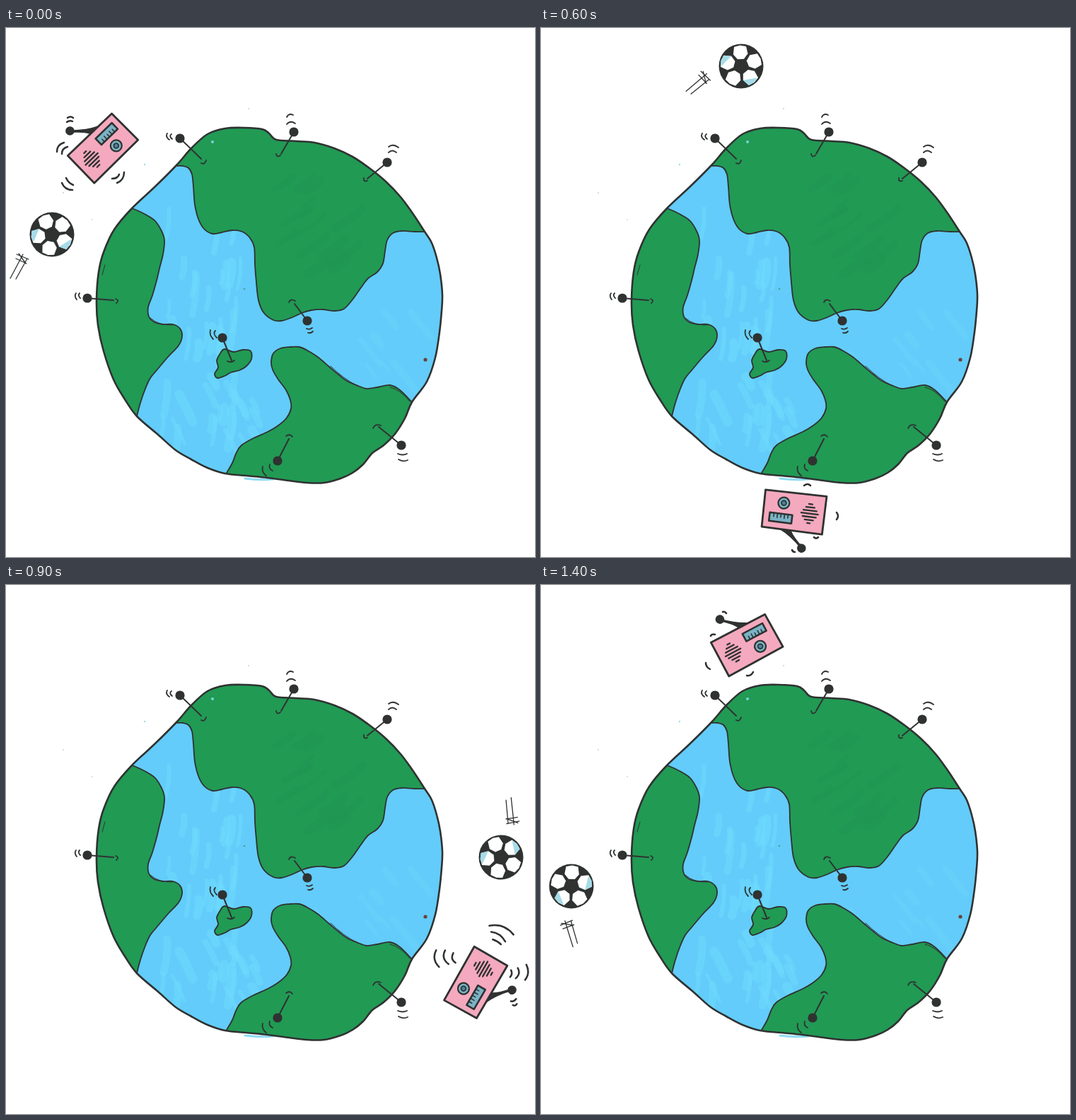
An HTML page that plays this animation: 748 by 748 pixels, repeating every 1500 ms.

```html
<!DOCTYPE html>
<html lang="en">
<head>
<meta charset="utf-8">
<title>Radios around the world</title>
<style>
html, body { margin: 0; width: 100%; height: 100%; overflow: hidden; background: #fff; }
svg { display: block; width: 100vw; height: 100vh; }
path, line { stroke-linecap: round; stroke-linejoin: round; }
.ink { fill: none; stroke: #2f3231; }
.dark { fill: #2f3231; }
</style>
</head>
<body>
<svg viewBox="0 0 748 748">
  <defs><clipPath id="globe"><path id="globeClip"/></clipPath></defs>
  <g id="world"></g>
  <g id="ball"></g>
  <path id="marks" class="ink" stroke-width="2.5"/>
  <g id="radio"></g>
</svg>
<script>
const NS = 'http://www.w3.org/2000/svg';
const $ = id => document.getElementById(id);

function add(parent, tag, attrs) {
  const el = document.createElementNS(NS, tag);
  for (const k in attrs) el.setAttribute(k, attrs[k]);
  parent.appendChild(el);
  return el;
}

// Smooth path through a list of "x,y" points
function curve(text, closed) {
  const p = text.split(' ').map(s => s.split(',').map(Number));
  const n = p.length;
  const at = i => closed ? p[(i + n) % n] : p[Math.max(0, Math.min(n - 1, i))];
  let d = 'M' + p[0];
  for (let i = 0; i < (closed ? n : n - 1); i++) {
    const [a, b, c, e] = [at(i - 1), at(i), at(i + 1), at(i + 2)];
    d += 'C' + [0, 1].map(k => (b[k] + (c[k] - a[k]) / 6).toFixed(1)) +
      ' ' + [0, 1].map(k => (c[k] - (e[k] - b[k]) / 6).toFixed(1)) + ' ' + c;
  }
  return closed ? d + 'Z' : d;
}

let seed = 7;
const rnd = () => (seed = (seed * 16807) % 2147483647) / 2147483647;

function brush(parent, n, [x, y, w, h], len, slope, color, opacity) {
  for (let i = 0; i < n; i++) {
    const px = x + rnd() * w, py = y + rnd() * h, l = len * (0.4 + rnd());
    add(parent, 'path', {
      d: `M${px} ${py}q${l * slope * 0.3 + 3} ${l * 0.4} ${l * slope} ${l}`,
      fill: 'none', stroke: color, 'stroke-width': 4 + rnd() * 9, opacity
    });
  }
}

function drawWorld() {
  const g = $('world');
  const outline = curve('310,142 336,141 362,143 372,149 382,158 410,160 436,162 464,170 490,182 515,199 537,217 558,239 575,262 592,288 602,304 609,325 614,348 617,377 616,400 613,430 607,466 595,500 574,529 564,552 550,574 534,590 518,601 505,617 490,629 473,637 450,643 425,643 400,640 370,636 340,633 310,630 285,622 262,610 240,597 215,575 185,549 168,525 152,497 138,457 130,420 128,385 131,345 138,317 153,285 178,255 210,225 242,193 262,170 285,150', true);
  const north = curve('242,195 250,195 258,198 263,207 265,225 267,250 272,270 280,284 292,291 305,289 320,286 334,288 345,297 351,310 352,335 354,360 357,385 364,402 378,413 390,414 405,409 418,403 432,399 448,398 465,400 478,397 490,384 502,367 512,354 525,345 533,333 536,315 539,300 547,290 560,287 578,288 592,288');
  const west = curve('178,255 190,260 203,267 212,274 220,287 224,300 222,320 217,340 213,357 207,378 201,395 202,408 210,416 222,419 236,419 246,425 249,436 244,449 230,464 213,484 204,495 197,510 190,530 185,549');
  const south = curve('312,629 320,615 326,600 333,590 350,580 370,571 385,562 397,551 403,538 402,526 396,512 385,497 377,483 375,472 378,460 388,453 402,451 415,451 428,457 442,466 457,479 470,490 482,499 498,506 510,510 525,508 543,505 557,512 574,529');
  const island = curve('309,454 322,458 335,455 346,457 347,468 340,478 330,484 318,487 309,492 299,495 295,489 300,480 298,470 303,460', true);
  $('globeClip').setAttribute('d', outline);

  add(g, 'path', { d: 'M338 637q20 3 40 1', stroke: '#8fdcf2', 'stroke-width': 3, fill: 'none' });
  const inside = add(g, 'g', { 'clip-path': 'url(#globe)' });
  add(inside, 'path', { d: outline, fill: '#63ccfa' });
  brush(inside, 34, [222, 255, 110, 320], 42, -0.1, '#70dafe', 0.55);
  brush(inside, 12, [215, 490, 150, 90], 28, 0.5, '#70dafe', 0.55);
  brush(inside, 9, [400, 400, 180, 80], 30, 0.8, '#6ad3fc', 0.5);
  const lands = [north + 'L700 288V0H200Z', west + 'L0 549V255Z', south + 'L700 529V700H312Z', island];
  lands.forEach(d => add(inside, 'path', { d, fill: '#219a54' }));
  brush(inside, 14, [385, 200, 120, 130], 26, -1.4, '#1e9450', 0.4);
  [north, west, south, island].forEach(d => add(g, 'path', { d, class: 'ink', 'stroke-width': 1.8 }));
  add(g, 'path', { d: outline, class: 'ink', 'stroke-width': 2.6 });
  add(g, 'path', { d: 'M204 410q12 11 32 10M459 478q18 18 38 28M543 508q14 3 28 20M136 349l4-14', class: 'ink', 'stroke-width': 1 });

  const specks = [[593, 469, 2.6, '#6b4038'], [292, 161, 2, '#7fd0dc'], [196, 193, 1.2, '#9adbe8'],
    [343, 114, 0.8, '#aaa'], [81, 233, 0.8, '#aaa'], [122, 271, 0.8, '#bbb'], [337, 369, 1.3, '#4f9f8e']];
  specks.forEach(([cx, cy, r, fill]) => add(g, 'circle', { cx, cy, r, fill }));

  // foot x, y, head x, y, then foot curve and wiggle marks
  const pins = [
    [276, 185, 246, 156, 'M276 191Q281 194 283 187M234 150Q230 153 235 157M228 149Q225 154 231 158'],
    [389, 178, 407, 147, 'M382 178Q383 184 388 180M397 126Q400 120 406 123M397 136Q402 130 409 135'],
    [511, 213, 539, 190, 'M506 212Q505 218 511 216M541 168Q547 163 555 169M541 176Q546 171 552 176'],
    [152, 385, 115, 382, 'M155 383Q161 385 156 389M104 375Q101 378 105 382M99 375Q96 379 100 384'],
    [408, 390, 426, 414, 'M400 388Q402 382 409 386M425 425Q429 427 433 424M427 431Q431 432 434 429'],
    [319, 470, 306, 438, 'M313 471Q318 474 323 470M296 428Q292 432 298 438M289 427Q287 434 293 440'],
    [400, 581, 384, 612, 'M396 577Q401 573 405 578M373 617Q371 623 377 626M363 620Q361 628 368 633'],
    [527, 564, 559, 590, 'M519 566Q522 559 530 562M554 602Q561 605 567 602M555 610Q561 614 568 611']
  ];
  pins.forEach(([x1, y1, x2, y2, d]) => {
    add(g, 'line', { x1, y1, x2, y2, class: 'ink', 'stroke-width': 2 });
    add(g, 'circle', { cx: x2, cy: y2, r: 6.6, class: 'dark' });
    add(g, 'path', { d, class: 'ink', 'stroke-width': 1.8 });
  });
}

function drawRadio() {
  const g = $('radio');
  add(g, 'path', { d: 'M1 -27L18 -27Q2 -34 -15 -50L-17 -47Q-4 -36 1 -27Z', class: 'dark' });
  add(g, 'circle', { cx: -16.5, cy: -50, r: 6.3, class: 'dark' });
  add(g, 'path', { d: 'M-43 -27L43 -26.5L44 26L-43 27Z', fill: '#f4a9be', stroke: '#2f3231', 'stroke-width': 2.8 });
  add(g, 'path', { d: 'M2 -17H34V-5H2Z', fill: '#79b3c5', stroke: '#2f3231', 'stroke-width': 2.6 });
  add(g, 'path', { d: 'M8 -6v-4M13 -6v-5M18 -6v-4M23 -6v-5M28 -6v-4', class: 'ink', 'stroke-width': 1.6 });
  add(g, 'circle', { cx: 16, cy: 10.5, r: 8, fill: '#79b3c5', stroke: '#2f3231', 'stroke-width': 2.2 });
  add(g, 'circle', { cx: 16, cy: 10.5, r: 3.4, fill: '#4f8498', stroke: '#2f3231', 'stroke-width': 1.8 });
  [4, 12, 19, 24, 19, 12, 5].forEach((w, i) =>
    add(g, 'path', { d: `M${-22 - w / 2} ${(i - 3) * 4.5}h${w}`, class: 'ink', 'stroke-width': 2.3 }));
}

function drawBall() {
  const g = $('ball');
  const polar = (r, deg) => [r * Math.cos(deg * Math.PI / 180), r * Math.sin(deg * Math.PI / 180)].map(v => v.toFixed(1));
  const poly = (pts, fill) => add(g, 'path', { d: 'M' + pts.map(p => polar(...p)).join('L') + 'Z', fill });
  add(g, 'circle', { r: 31.5, class: 'dark' });
  for (let a = -115; a < 245; a += 72) {
    poly([[11, a - 24], [20, a - 31], [29, a - 17], [29.5, a], [29, a + 17], [20, a + 31], [11, a + 24]], '#fff');
    if (a === 29 || a === 173) poly([[20, a + 31], [29, a + 17], [29.5, a], [28, a - 15]], '#a5dbe8');
  }
  return add(g, 'path', {
    d: 'M-41 28L-59 62M-35 34L-51 63M-50 28L-33 35M-51 34L-36 41M-47 27L-37 41',
    class: 'ink', 'stroke-width': 1.3
  });
}

// Tracks around the globe: step, x, y, turn, scale
const CX = 373, CY = 390;
const radioTrack = track([
  [0, 137, 170, -44, 1], [1, 75, 330, -76, 1], [2, 63, 505, -109, 1], [4, 193, 658, -159, 1],
  [6, 358, 684, -173, 1], [8, 634, 648, -223, 1], [9, 664, 562, -240, 1], [11, 681, 345, -278, 1],
  [12, 650, 230, -312, 1], [14, 291, 85, -388, 1], [15, 137, 170, -404, 1]
]);
const ballTrack = track([
  [0, 65, 292, 0, 1], [2, 145, 264, 18, 0.5], [4, 168, 217, 22, 0.46], [6, 283, 54, 22, 1],
  [8, 657, 155, 100, 1], [9, 700, 385, 146, 1], [11, 365, 711, 236, 1], [12, 208, 712, 258, 1],
  [14, 43, 426, 315, 1], [15, 65, 292, 360, 1]
]);

const radioMarks = {
  0: 'M87 127Q91 124 95 127M86 133Q90 130 94 132M72 175Q72 165 82 162M79 178Q79 170 87 168M79 219Q83 229 94 229M85 212Q88 219 95 222M157 219Q167 215 167 204M150 213Q158 213 160 207',
  2: 'M111 491Q122 501 113 510M105 496Q111 502 104 507M97 567Q95 577 84 577M90 563Q88 570 79 570M38 552Q37 557 43 562M31 551Q31 559 38 564M2 526Q1 531 6 533M8 523Q8 527 11 528',
  4: 'M213 617Q222 613 230 617M215 627Q222 622 229 628M262 674Q269 682 261 690M255 677Q259 682 253 687M208 705Q214 709 222 706M209 713Q215 719 223 715M170 714Q170 718 174 719M177 712Q176 716 179 718',
  6: 'M372 647Q377 643 381 647M418 685Q422 690 418 695M386 720Q389 723 392 720M355 738Q356 741 359 741',
  8: 'M594 588Q584 598 591 612M606 592Q597 601 605 612M616 599Q609 606 615 613M676 577Q697 579 705 599M676 586Q688 591 691 605M675 597Q681 601 684 607M710 645Q712 658 702 665M697 646Q699 655 690 659M687 646Q688 652 683 655M674 688Q678 690 682 687M675 694Q678 697 681 694',
  11: 'M659 272Q667 267 676 271M661 282Q668 277 675 281M628 334Q625 343 633 349M636 332Q633 339 641 345M711 297Q716 301 712 306M717 292Q724 298 717 306M737 331Q741 331 742 327M740 337Q745 337 746 333',
  14: 'M233 110Q233 116 239 119M291 128Q297 129 300 123M240 72Q241 69 246 70M257 38Q260 37 262 40'
};

function track(keys) {
  let last = null;
  const nodes = keys.map(([step, x, y, turn, scale]) => {
    let a = Math.atan2(y - CY, x - CX);
    if (last !== null) a -= Math.round((a - last) / (2 * Math.PI)) * 2 * Math.PI;
    last = a;
    return [step, a, Math.hypot(x - CX, y - CY), turn, scale];
  });
  return step => {
    const i = nodes.findIndex((n, j) => j > 0 && n[0] > step);
    const p = nodes[i - 1], q = nodes[i], u = (step - p[0]) / (q[0] - p[0]);
    const [a, r, turn, scale] = [1, 2, 3, 4].map(k => p[k] + (q[k] - p[k]) * u);
    return { x: CX + r * Math.cos(a), y: CY + r * Math.sin(a), turn, scale };
  };
}

const place = (id, p) =>
  $(id).setAttribute('transform', `translate(${p.x} ${p.y}) rotate(${p.turn}) scale(${p.scale})`);

drawWorld();
drawRadio();
const trail = drawBall();
const markSteps = Object.keys(radioMarks).map(Number);

function render(step) {
  const r = radioTrack(step);
  place('radio', r);
  place('ball', ballTrack(step));
  trail.setAttribute('visibility', step === 4 ? 'hidden' : 'visible');
  const near = markSteps.reduce((a, b) => Math.abs(b - step) < Math.abs(a - step) ? b : a);
  const k = radioTrack(near);
  $('marks').setAttribute('d', radioMarks[near]);
  $('marks').setAttribute('transform',
    `translate(${r.x} ${r.y}) rotate(${r.turn - k.turn}) translate(${-k.x} ${-k.y})`);
}

const start = performance.now();
let shown = -1;
function tick() {
  const step = Math.floor((performance.now() - start) % 1500 / 100);
  if (step !== shown) render(shown = step);
  requestAnimationFrame(tick);
}
tick();
</script>
</body>
</html>
```
